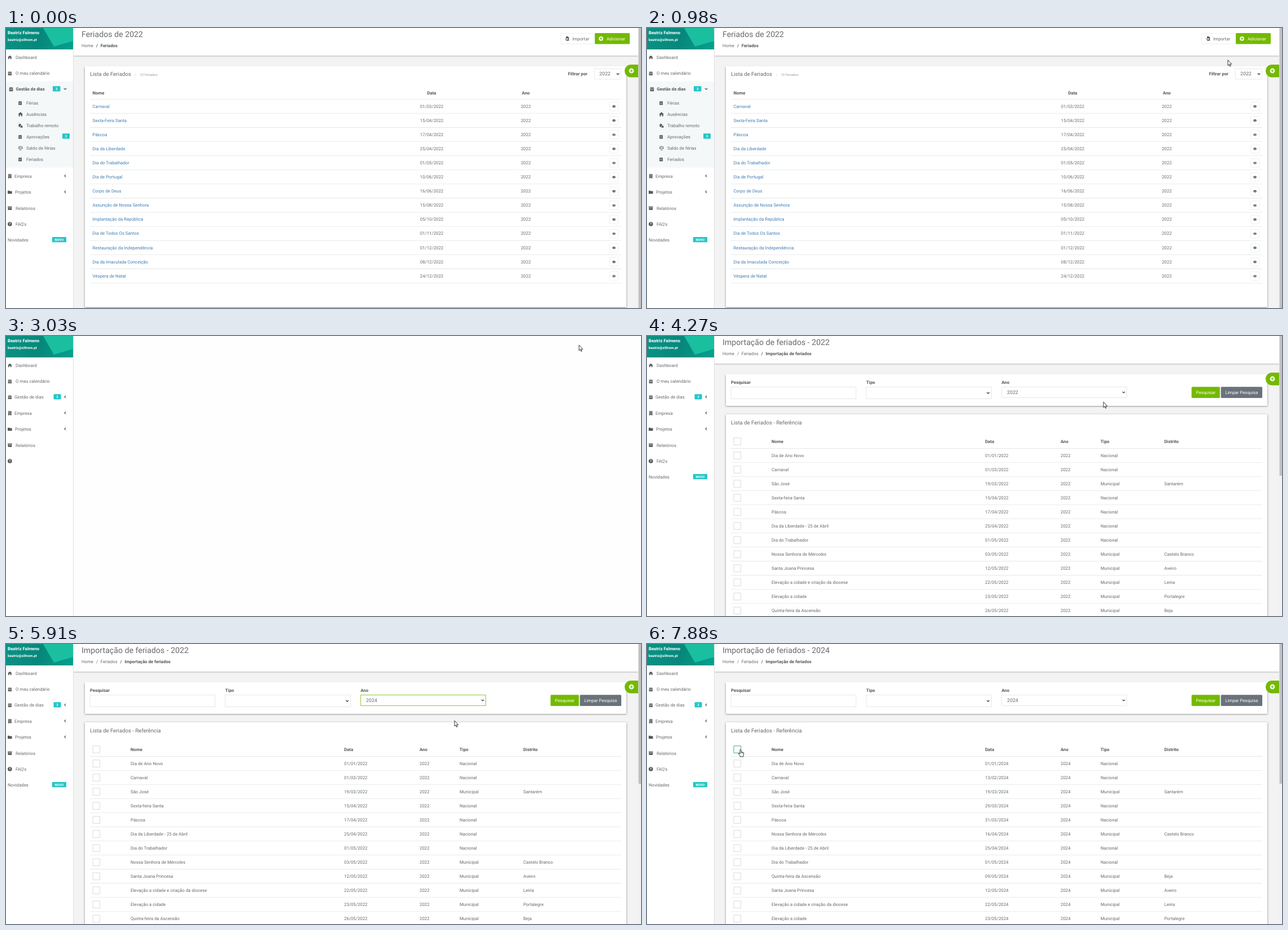
Recreate the animation shown at these times as an HTML page with a canvas. Size 1127 px wide and 497 px high, loop 8 s.

```html
<!DOCTYPE html>
<html lang="pt">
<head>
<meta charset="utf-8">
<title>Importação de feriados</title>
<style>
  html, body { margin: 0; width: 100%; height: 100%; overflow: hidden; background: #fff; }
  canvas { display: block; width: 1127px; height: 497px; }
</style>
</head>
<body>
<canvas id="stage"></canvas>
<script>
const W = 1127, H = 497, LOOP = 8000;
const GREY = '#676a6c', DARK = '#55585a', LINE = '#e7eaec', GREEN = '#73b900', TEAL = '#23c6c8';
const canvas = document.getElementById('stage');
const ctx = canvas.getContext('2d');
const ratio = window.devicePixelRatio || 1;
canvas.width = W * ratio;
canvas.height = H * ratio;
ctx.scale(ratio, ratio);
ctx.textRendering = 'geometricPrecision';

// Icons live in an 8 x 8 box.
const icons = {
  home: 'M0 4L4 .5 8 4H7V7.5H5V5H3V7.5H1V4Z',
  calendar: 'M.7 1.3H2V.3H3V1.3H5V.3H6V1.3H7.3V2.8H.7ZM.7 3.3H7.3V7.8H.7ZM2 4.5V5.3H6V4.5Z',
  building: 'M1 0H7V8H4.7V6.3H3.3V8H1ZM2.3 1.2V2.4H3.4V1.2ZM4.6 1.2V2.4H5.7V1.2ZM2.3 3.7V4.9H3.4V3.7ZM4.6 3.7V4.9H5.7V3.7Z',
  folder: 'M0 1.2H3L4 2.2H8V7H0Z',
  archive: 'M0 .8H8V2.6H0ZM.5 3.1H7.5V7.4H.5ZM3 4V4.7H5V4Z',
  remote: 'M0 3.5L3 .7 6 3.5H5.2V4H3.5V6.3H1V3.5ZM4 4.5H7.5V7H8V7.6H3.6V7H4Z',
  scales: 'M3.7 .3H4.3V6.8H6V7.5H2V6.8H3.7ZM.5 1.2H7.5V1.8H.5ZM0 5.2L1.5 2 3 5.2ZM5 5.2L6.5 2 8 5.2Z',
  eye: 'M0 4Q4 -.8 8 4Q4 8.8 0 4ZM1 4Q4 7.4 7 4Q4 .6 1 4ZM4 2.4A1.6 1.6 0 1 0 4.01 2.4Z',
  file: 'M2 0H5.5L7.5 2V8H2V5.4H4.5V6.6L6.5 4.7 4.5 2.8V4H2ZM0 4.1H2V5.3H0Z'
};
for (const name in icons) icons[name] = new Path2D(icons[name]);

const arrowShape = new Path2D('M0 0V9.9L2.2 7.9 3.7 11.4 5.2 10.7 3.7 7.4H6.7Z');
const handShape = new Path2D('M-1 1Q0 -.6 1 1V4.6L4.4 5.3Q6 5.7 5.8 7.5L5 10.5V13H-.6V11.5L-3.6 8Q-3.8 6.3-2.3 6.8L-1 8Z');

function text(str, x, y, { size = 7.8, color = GREY, weight = 400, align = 'left' } = {}) {
  ctx.font = `${weight} ${size}px Roboto, sans-serif`;
  ctx.fillStyle = color;
  ctx.textAlign = align;
  ctx.fillText(str, x, y + size * .35);
}
const bold = (str, x, y, opts) => text(str, x, y, { weight: 700, color: DARK, ...opts });

function rect(x, y, w, h, fill, stroke, radius = 0) {
  ctx.beginPath();
  ctx.roundRect(x, y, w, h, radius);
  if (fill) { ctx.fillStyle = fill; ctx.fill(); }
  if (stroke) { ctx.strokeStyle = stroke; ctx.lineWidth = .8; ctx.stroke(); }
}

function shadowed(draw, color = 'rgba(0,0,0,.5)', blur = 3, dy = 1) {
  ctx.save();
  Object.assign(ctx, { shadowColor: color, shadowBlur: blur * ratio, shadowOffsetY: dy * ratio });
  draw();
  ctx.restore();
}
const panel = (y, h) => shadowed(() => rect(140, y, 961, h, '#fff'));

function icon(name, x, y, color = DARK, scale = 1) {
  ctx.save();
  ctx.translate(x, y - 4 * scale);
  ctx.scale(scale, scale);
  ctx.fillStyle = color;
  ctx.fill(icons[name], 'evenodd');
  ctx.restore();
}

function chevron(x, y, left, color = DARK) {
  ctx.beginPath();
  if (left) { ctx.moveTo(x + 1, y - 2.2); ctx.lineTo(x - 1.1, y); ctx.lineTo(x + 1, y + 2.2); }
  else { ctx.moveTo(x - 2.2, y - 1); ctx.lineTo(x, y + 1.2); ctx.lineTo(x + 2.2, y - 1); }
  ctx.strokeStyle = color;
  ctx.lineWidth = 1.2;
  ctx.stroke();
}

function disc(x, y, r, color) {
  ctx.beginPath();
  ctx.arc(x, y, r, 0, 7);
  ctx.fillStyle = color;
  ctx.fill();
}

function plus(x, y, r) {
  disc(x, y, r, '#fff');
  rect(x - r * .6, y - .6, r * 1.2, 1.2, GREEN);
  rect(x - .6, y - r * .6, 1.2, r * 1.2, GREEN);
}

function badge(str, x, y, w) {
  rect(x, y - 4.6, w, 9.2, TEAL, null, .8);
  text(str, x + w / 2, y, { size: 5.8, weight: 700, color: '#fff', align: 'center' });
}

function button(str, x, w, fill) {
  rect(x, 90.3, w, 19.6, fill, null, 1.5);
  text(str, x + w / 2, 100.3, { color: '#fff', align: 'center' });
}

function rule(y) { rect(149, y - .4, 943, .8, '#e2e5e7'); }

function profile() {
  const fade = ctx.createLinearGradient(0, 0, 119, 38);
  fade.addColorStop(0, '#0a9385');
  fade.addColorStop(.5, '#07877b');
  fade.addColorStop(1, '#05a08f');
  rect(0, 0, 119, 38, fade);
  ctx.beginPath();
  ctx.moveTo(66, 0); ctx.lineTo(85, 33); ctx.lineTo(119, 23); ctx.lineTo(119, 0);
  ctx.fillStyle = '#1abf9f';
  ctx.fill();
  bold('Beatriz Falmeno', 3, 8, { color: '#fff', size: 7.7 });
  bold('beatriz@ziltrom.pt', 3, 20.5, { color: '#fff', size: 6.2 });
}

function sidebar(open, loading) {
  rect(0, 0, 119.5, H, '#fff');
  rect(119, 0, .9, H, '#d9dcde');
  profile();
  if (open) rect(0, 94.5, 119, 153.5, '#f5f8f9');
  const item = (name, label, x, y) => { icon(name, 3, y, DARK, .95); text(label, x, y); };
  item('home', 'Dashboard', 17, 52);
  item('calendar', 'O meu calendário', 17, 80.5);
  if (open) {
    icon('calendar', 5, 108.5);
    bold('Gestão de dias', 17.5, 108.5, { size: 7.7 });
    badge('3', 83, 107.8, 13.5);
    chevron(105, 108, false);
    const submenu = [['calendar', 'Férias'], ['home', 'Ausências'], ['remote', 'Trabalho remoto'],
      ['calendar', 'Aprovações'], ['scales', 'Saldo de férias'], ['calendar', 'Feriados']];
    submenu.forEach(([name, label], i) => {
      const y = 133 + i * 20;
      icon(name, 21.5, y, DARK, name === 'calendar' ? .9 : 1.05);
      text(label, 36, y);
    });
    badge('3', 100, 191.8, 13);
  } else {
    item('calendar', 'Gestão de dias', 15, 108.5);
    badge('3', 84.5, 107.8, 13);
    chevron(105, 108, true);
  }
  const dy = open ? 126 : 0;
  item('building', 'Empresa', 15, 137 + dy);
  item('folder', 'Projetos', 16, 165.3 + dy);
  chevron(105, 136.5 + dy, true);
  chevron(105, 164.8 + dy, true);
  item('archive', 'Relatórios', 17, 193.8 + dy);
  disc(6.8, 222 + dy, 3.8, DARK);
  bold('?', 6.8, 222 + dy, { color: '#fff', size: 6, align: 'center' });
  if (loading) return;
  text('FAQ\'s', 17, 222 + dy);
  text('Novidades', 3, 250.3 + dy);
  badge('NOVO', 81.8, 249.7 + dy, 25.2);
}

function frame(title, crumbs, thumb) {
  rect(119.5, 0, W, H, '#f3f3f4');
  shadowed(() => rect(119.5, 0, 1002.5, 49, '#fff'), 'rgba(0,0,0,.25)', 2);
  text(title, 134, 11, { size: 14.2 });
  let x = 134;
  crumbs.forEach((crumb, i) => {
    const last = i === crumbs.length - 1, draw = last ? bold : text;
    draw(crumb, x, 31);
    x += ctx.measureText(crumb).width + 5;
    if (!last) { (i === crumbs.length - 2 ? bold : text)('/', x, 31); x += 7.7; }
  });
  rect(1122, 0, 5, H, '#f1f1f1');
  rect(1122.5, 0, 4.5, thumb, '#c1c1c1');
}

function bubble() {
  rect(1098, 65, 24, 22.5, GREEN, null, [11.2, 0, 0, 11.2]);
  plus(1110, 76, 4.4);
}

const holidays = [['Carnaval', '01/03'], ['Sexta-Feira Santa', '15/04'], ['Páscoa', '17/04'],
  ['Dia da Liberdade', '25/04'], ['Dia do Trabalhador', '01/05'], ['Dia de Portugal', '10/06'],
  ['Corpo de Deus', '16/06'], ['Assunção de Nossa Senhora', '15/08'], ['Implantação da República', '05/10'],
  ['Dia de Todos Os Santos', '01/11'], ['Restauração da Independência', '01/12'],
  ['Dia da Imaculada Conceição', '08/12'], ['Véspera de Natal', '24/12']];

function holidayPage(cursor) {
  frame('Feriados de 2022', ['Home', 'Feriados'], H);
  sidebar(true);
  const hover = onImport(cursor);
  rect(984.5, 9.5, 58.5, 18.8, '#fff', hover ? '#c8cccf' : LINE, 1.5);
  icon('file', 992, 18.8, DARK, .95);
  text('Importar', 1005, 19, { color: hover ? '#333' : GREY });
  rect(1045, 9, 62, 19.5, GREEN, null, 1.5);
  plus(1056, 18.8, 3.9);
  text('Adicionar', 1066, 19, { color: '#fff' });

  panel(67.5, 428);
  text('Lista de Feriados', 149, 82, { size: 9.6 });
  text('-', 229, 83, { size: 6 });
  text('13 Feriados', 237.5, 83.3, { size: 6, color: '#999b9d' });
  bold('Filtrar por', 997.5, 81.3);
  rect(1044, 72.3, 47.5, 18.5, '#fff', '#e2e4e6', 1);
  text('2022', 1053, 81.4, { size: 8.8 });
  chevron(1086, 81.5, false, '#333');

  bold('Nome', 153.5, 115.3);
  bold('Data', 755.5, 115.3, { align: 'center' });
  bold('Ano', 922.5, 115.3, { align: 'center' });
  holidays.forEach(([name, date], i) => {
    const top = 126.3 + i * 25.1, y = top + 12.5;
    if (cursor && cursor.x < 1092 && cursor.y > top && cursor.y <= top + 25.1)
      rect(149, top, 943, 25.1, '#f3f3f4');
    rule(top);
    text(name, 153.5, y, { color: '#3f7db5' });
    text(date + '/2022', 755.5, y, { align: 'center' });
    text('2022', 922.5, y, { align: 'center' });
    rect(1071.3, y - 7.4, 15.4, 15.4, '#fff', LINE, 1.2);
    icon('eye', 1075.3, y + .4, DARK, .92);
  });
  rule(452.8);
  bubble();
}

const asc = 'Quinta-feira da Ascensão', lib = 'Dia da Liberdade - 25 de Abril';
const mercoles = 'Nossa Senhora de Mércoles';
const shared = [['Santa Joana Princesa', '12/05', 'Aveiro'],
  ['Elevação a cidade e criação da diocese', '22/05', 'Leiria'], ['Elevação a cidade', '23/05', 'Portalegre']];
const reference = {
  2022: [['Dia de Ano Novo', '01/01'], ['Carnaval', '01/03'], ['São José', '19/03', 'Santarém'],
    ['Sexta-feira Santa', '15/04'], ['Páscoa', '17/04'], [lib, '25/04'], ['Dia do Trabalhador', '01/05'],
    [mercoles, '03/05', 'Castelo Branco'], ...shared, [asc, '26/05', 'Beja'], ['Dia de Portugal', '10/06']],
  2024: [['Dia de Ano Novo', '01/01'], ['Carnaval', '13/02'], ['São José', '19/03', 'Santarém'],
    ['Sexta-feira Santa', '29/03'], ['Páscoa', '31/03'], [mercoles, '16/04', 'Castelo Branco'],
    [lib, '25/04'], ['Dia do Trabalhador', '01/05'], [asc, '09/05', 'Beja'], ...shared, ['Corpo de Deus', '30/05']]
};

function checkbox(y, styled, active) {
  if (styled) rect(154, y - 6.2, 12.6, 12.6, '#fff', active ? '#16947e' : '#cfd2d4');
  else rect(154, y - 4.8, 7.2, 7.2, '#fff', '#7b7b7b', 1.3);
}

function importPage({ year, picked, styled, focus, checkHover }) {
  frame('Importação de feriados - ' + year, ['Home', 'Feriados', 'Importação de feriados'], styled ? 248 : 265);
  sidebar(false);
  panel(67.5, 56.5);
  bold('Pesquisar', 149, 82);
  bold('Tipo', 389, 82);
  bold('Ano', 629.3, 82);
  rect(149, 90.5, 222, 21, '#fff', '#e0e3e5');
  rect(389, 90.5, 222.5, 21, '#fff', '#e0e3e5');
  rect(629.5, 90.5, 222, 19, '#fff', focus ? GREEN : '#e0e3e5');
  chevron(605.5, 101, false, '#333');
  chevron(846, 99.8, false, '#333');
  text(picked, 639, 100, { size: 8.8 });
  button('Pesquisar', 966.5, 50.3, GREEN);
  button('Limpar Pesquisa', 1018.5, 73.5, '#6a727b');

  panel(139, 400);
  text('Lista de Feriados - Referência', 149, 153.5, { size: 9.6 });
  const cols = styled ? [221, 600, 734, 805, 918] : [200, 588.5, 725.5, 798, 914];
  const step = styled ? 25.03 : 22.95, first = styled ? 199.5 : 198.5;
  ['Nome', 'Data', 'Ano', 'Tipo', 'Distrito'].forEach((label, i) => bold(label, cols[i], 187));
  checkbox(187, styled, checkHover);
  reference[year].forEach(([name, date, district], i) => {
    const top = first + i * step, y = top + step / 2;
    rule(top);
    checkbox(y, styled);
    [name, `${date}/${year}`, year, district ? 'Municipal' : 'Nacional', district || '']
      .forEach((cell, c) => text(cell, cols[c], y));
  });
  rule(first + 13 * step);
  bubble();
}

function yearMenu(cursor) {
  shadowed(() => rect(629.5, 110, 222, 98, '#fff', '#bbb'), 'rgba(0,0,0,.3)', 6, 2);
  const row = cursor.y < 117 ? 3 : Math.min(5, Math.floor((cursor.y - 117) / 14));
  for (let i = 0; i < 6; i++) {
    if (i === row) rect(630, 117 + i * 14, 221, 14, '#1e73d8');
    text(String(2025 - i), 639, 124 + i * 14, { size: 8.8, color: i === row ? '#fff' : GREY });
  }
}

function loadingPage() {
  rect(0, 0, W, H, '#fefefe');
  sidebar(false, true);
}

// Cursor stops: time, x, y.
const path = [[440, 1092, 440], [980, 1031, 57], [1140, 1024, 12], [1220, 1027, 29], [1460, 1014, 9],
  [2390, 1014, 9], [2480, 1016, 9], [2939, 1016, 9], [2940, 1017, 16], [3900, 1017, 16], [4270, 810, 117],
  [4510, 838, 102], [4740, 838, 102], [5220, 796, 147], [5440, 796, 147], [5530, 796, 136],
  [6180, 796, 136], [6790, 184, 160], [7000, 183, 160], [7300, 146, 188], [7480, 148, 196],
  [7820, 165, 187], [7880, 166, 187], [8000, 166, 187]];

function cursorAt(t) {
  if (t < path[0][0]) return null;
  const i = path.findIndex(stop => stop[0] > t);
  const [t0, x0, y0] = path[i - 1], [t1, x1, y1] = path[i];
  const k = (t - t0) / (t1 - t0);
  return { x: x0 + (x1 - x0) * k, y: y0 + (y1 - y0) * k };
}

function onImport(c) {
  return !!c && c.x > 984 && c.x < 1043 && c.y >= 9 && c.y < 28;
}

function drawCursor(c, hand) {
  ctx.save();
  ctx.translate(c.x, c.y);
  const shape = hand ? handShape : arrowShape;
  ctx.fillStyle = '#fff';
  ctx.strokeStyle = '#222';
  ctx.lineWidth = .9;
  ctx.lineJoin = 'round';
  ctx.fill(shape);
  ctx.stroke(shape);
  if (hand) {
    ctx.beginPath();
    for (const x of [1, 2.6, 4.2]) { ctx.moveTo(x, 4.8); ctx.lineTo(x, 7.4); }
    ctx.lineWidth = .6;
    ctx.stroke();
  }
  ctx.restore();
}

function draw(t) {
  const cursor = cursorAt(t);
  const onCheck = t > 7020 && cursor.x > 154 && cursor.x < 167 && cursor.y > 181 && cursor.y < 193.5;
  if (t < 2940) holidayPage(cursor);
  else if (t < 3330 || (t >= 6390 && t < 6620)) loadingPage();
  else importPage({
    year: t < 6390 ? '2022' : '2024',
    picked: t < 5850 ? '2022' : '2024',
    styled: t >= 6870 || (t >= 3480 && t < 6390),
    focus: t >= 4740 && t < 6390,
    checkHover: onCheck
  });
  if (t >= 4820 && t < 5850) yearMenu(cursor);
  if (cursor) drawCursor(cursor, onCheck || (t < 2940 && onImport(cursor)));
}

function tick() {
  draw(performance.now() % LOOP);
  requestAnimationFrame(tick);
}
tick();
</script>
</body>
</html>
```
